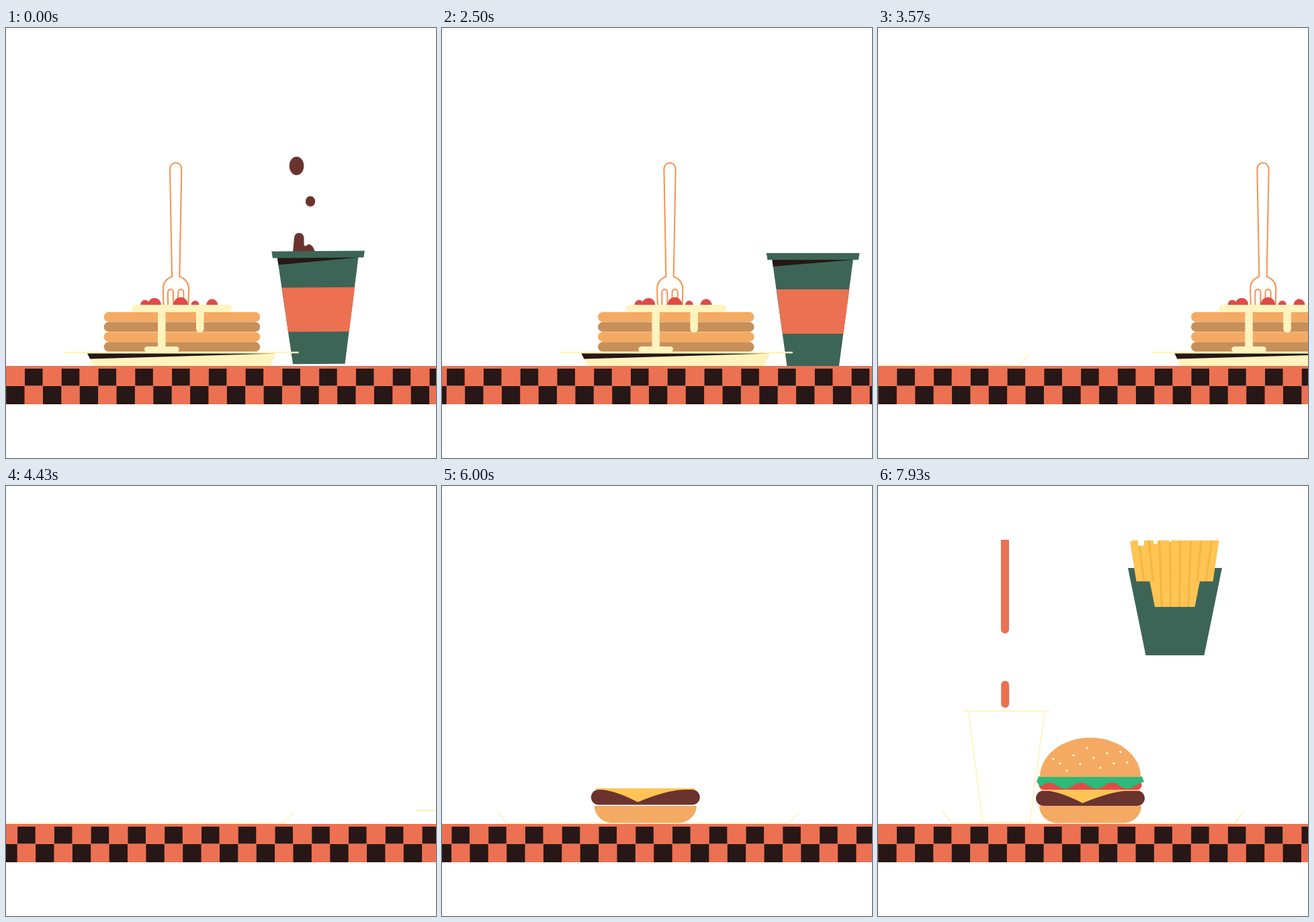
These frames come from a looping animation (640x640 px, 8000 ms). An HTML page with a canvas:

```html
<!DOCTYPE html>
<html lang="en">
<head>
<meta charset="utf-8">
<title>Diner counter</title>
<style>
  html, body { margin: 0; width: 100%; height: 100%; overflow: hidden; background: #fff; }
  canvas { display: block; width: 100vw; height: 100vh; }
</style>
</head>
<body>
<canvas id="stage" width="640" height="640"></canvas>
<script>
const ctx = document.getElementById('stage').getContext('2d');
const LOOP = 8000;
const CREAM = '#fff3be', DARK = '#271716', CORAL = '#eb7152', GREEN = '#3c6558',
      BUN = '#f4aa62', TOAST = '#c88f58', BROWN = '#6b332e', RED = '#e04b48',
      CHEESE = '#ffc453', LEAF = '#2db978', FORK = '#f6924f', FRY_SHADE = '#f2b643';

const clamp = v => Math.max(0, Math.min(1, v));
const mix = (a, b, k) => a + (b - a) * k;

// ---------- drawing helpers ----------
function fill(color, d) {
  ctx.fillStyle = color;
  ctx.fill(new Path2D(d));
}
function line(color, width, d, cap = 'butt') {
  ctx.strokeStyle = color;
  ctx.lineWidth = width;
  ctx.lineCap = cap;
  ctx.stroke(new Path2D(d));
}
function bar(color, x, y, w, h, r = 0) {
  ctx.fillStyle = color;
  ctx.beginPath();
  ctx.roundRect(x, y, w, h, r);
  ctx.fill();
}
function oval(color, x, y, rx, ry = rx) {
  ctx.fillStyle = color;
  ctx.beginPath();
  ctx.ellipse(x, y, rx, ry, 0, 0, 2 * Math.PI);
  ctx.fill();
}
function dome(color, x, y, rx, ry) {
  fill(color, `M${x - rx} ${y}A${rx} ${ry} 0 0 1 ${x + rx} ${y}Z`);
}
function at(x, y, degrees, draw) {
  ctx.save();
  ctx.translate(x, y);
  ctx.rotate(degrees * Math.PI / 180);
  draw();
  ctx.restore();
}

// ---------- motion ----------
// Strong ease in and out of the sideways move, halfway at 3570 ms.
function slide(t) {
  const x = clamp(0.5 + (t - 3570) / 7200), a = x < 0.5 ? 0.755 : 0.73;
  let lo = 0, hi = 1;
  for (let i = 0; i < 24; i++) {
    const s = (lo + hi) / 2, r = 1 - s;
    if (3 * a * s * r * r + 3 * (1 - a) * s * s * r + s ** 3 < x) lo = s; else hi = s;
  }
  return lo * lo * (3 - 2 * lo);
}
// Height above the resting place for a part that lands at the given time.
const height = (t, land) => 420 * (1 - clamp((t - land + 500) / 500) ** 2);
// 1 in the air, 0 shortly after landing.
const airborne = (t, land) => clamp((land - t + 30) / 80);

function drop(t, land, draw) {
  if (t < land - 500) return;
  at(0, -height(t, land), 0, () => draw(airborne(t, land)));
}

// ---------- table ----------
function table(p) {
  const period = 54.77, shift = (28 + p * 12 * period) % period;
  bar(CORAL, 0, 503, 640, 57);
  for (let x = shift - 2 * period; x < 640; x += period) {
    bar(DARK, x, 507, 26.5, 25.3);
    bar(DARK, x + period / 2 - 0.4, 533, 27.3, 27);
  }
}

// ---------- breakfast ----------
function coffeeCup(t) {
  const fallen = Math.min(170, 150 * (t / 420) ** 2);
  if (t < 450) {
    oval(BROWN, 432.5, 205.3 + fallen, 10.8, 13.7);
    oval(BROWN, 453, 258 + fallen, 7.2, 7.8);
    at(0, fallen * 0.7, 0, () => fill(BROWN,
      'M427 333L429 312Q430 305 436 305Q443 305 443.5 313V322Q445 327 448 323Q455 319 460 333V345H427Z'));
  }
  const hop = 1 - clamp(t / 350);
  at(466, 503 - 3 * hop, -0.4 * hop, () => {
    ctx.translate(-466, -503);
    fill(GREEN, 'M396.5 335H535L533.5 345H525.5L504.5 503H427L405 345H398Z');
    fill(CORAL, 'M411.5 389H520L511 455H420.3Z');
    fill(DARK, 'M405 345H525.5L406.5 355Z');
  });
}

function pancakes() {
  line(FORK, 2, 'M234.5 412L233.8 388Q234 375 247 370L244 209.5A8.6 8.6 0 0 1 261.3 209.5L258.3 370' +
    'Q271.5 375 272 388L271.3 412M241 412V393A4 4 0 0 1 249 393V412M256.2 412V393A4 4 0 0 1 264.3 393V412');
  for (const [x, r] of [[207, 7], [221, 10], [260, 11], [281.5, 6], [306.7, 8.5]])
    dome(RED, x, 412.2, r, r + 0.4);
  for (let i = 0; i < 4; i++)
    bar(i % 2 ? TOAST : BUN, 145.7, 422.7 + i * 14.85, 232.5, 14.6, 7.3);
  bar(CREAM, 187.3, 412, 149.2, 11, 5.5);
  bar(CREAM, 226, 416, 11.5, 62);
  bar(CREAM, 283, 416, 11.5, 37.5, 5.7);
  bar(CREAM, 206, 474, 51.5, 8.5, 4.2);
  fill(CREAM, 'M121 484H402L393.5 503H130.5Z');
  fill(DARK, 'M121 484.3L402 484.5L125 492.5Z');
  line(CREAM, 2.4, 'M88 483H435.5');
}

// ---------- burger meal ----------
function sodaCup(t) {
  const land = 6600;
  if (t < land - 500) return;
  const since = Math.max(0, t - land);
  const tilt = -4.6 * Math.exp(-since / 1000) * Math.cos(2 * Math.PI * since / 484);
  at(191, 501 - height(t, land), tilt, () =>
    line(CREAM, 1.8, 'M-64 -166H64M-56.5 -166L-35 0H35L57 -166'));
}

// Flat top and wavy hem at rest; in the air the leaf hangs with one long tip.
function lettuce(k) {
  const top = v => mix(433, 451 - 22 * Math.abs(v) ** 2.2 + 5 * v ** 3, k);
  const hem = v => {
    const edge = 80 * (1 - Math.abs(v)), d = 80 * v;
    const resting = Math.min(445.3 + 4.5 * Math.cos((d + 38) * 2 * Math.PI / 47), 440 + 1.5 * edge);
    const flying = Math.min(467 + 14 * Math.exp(-(((d - 14) / 9) ** 2)), 430 + 2.2 * edge + 4 * v);
    return mix(resting, flying, k);
  };
  const points = [], steps = 40;
  for (let i = 0; i <= steps; i++) {
    const v = 2 * i / steps - 1, x = 316 + 3 * k;
    points.push([x + 76.5 * v, top(v)]);
    points.unshift([x + 79 * v, hem(v)]);
  }
  fill(LEAF, 'M' + points.join('L') + 'Z');
  line(LEAF, 1.5, 'M' + points.join('L') + 'Z', 'round');
}

function topBun(k) {
  const w = 75 - 2.5 * k;
  at(316 + 2 * k, 433, -5 * k, () => {
    dome(BUN, 0, 0, w, 58.5);
    fill(BUN, `M${-w} -0.5Q0 ${15 * k} ${w} -0.5Z`);
    for (let i = 0; i < 12; i++) {
      const x = -55 + 10 * i, level = 0.18 + 0.65 * ((0.764 + 0.618 * i) % 1);
      oval(CREAM, x, -58.5 * Math.sqrt(1 - (x / 75) ** 2) * level, 1.8, 1.8 + 0.3 * k);
    }
  });
}

function burger(t) {
  drop(t, 5381, k => {
    const s = 16 * k;
    fill(BUN, `M240 476Q316 ${476 + s} 392 476C392 490 380 501 366 501.5` +
      `Q316 ${501.5 + s} 266 501.5C252 501 240 490 240 476Z`);
  });
  at(0, -1.5 * clamp((6800 - t) / 100), 0, () => {
    drop(t, 5557, k => line(BROWN, 22.5, `M246.3 464.8Q316 ${464.8 + 16 * k} 385.7 464.8`, 'round'));
    drop(t, 6000, () => fill(CHEESE,
      'M242 451.5H390V453.5H372Q345 455 304.5 472Q272 455 250 453.5H242Z'));
    drop(t, 6580, () => bar(RED, 239.5, 438, 153, 14, 7));
  });
  drop(t, 6663, lettuce);
  drop(t, 6794, topBun);
}

function straw() {
  bar(CORAL, 183, 60, 12, 395.5, 6);
  bar(CORAL, 183.2, 526, 12, 40, 6);
}

function fries() {
  fill(GREEN, 'M372 371H512L485.5 501H398.5Z');
  fill(CHEESE, 'M375 332L384.5 391H404.5L412 429H471.5L479 391H498.5L507.5 330L380 330Z');
  for (let x = -53; x <= 56; x += 15.5)
    line(FRY_SHADE, 3, `M${441 + x} 331L${441 + x * 0.85} ${Math.abs(x) > 36 ? 391 : 429}`);
  for (let i = 0; i < 3; i++)
    bar('#fff', 387 + 23 * i, 330, 9 - 3 * i, 8 - 3 * i);
}

function mealTray(t) {
  line(CREAM, 1.8, 'M95.5 485L109.5 501.6H531L545 485');
  drop(t, 8100, straw);
  sodaCup(t);
  burger(t);
  drop(t, 8112, fries);
}

function render(t) {
  const p = slide(t);
  ctx.fillStyle = '#fff';
  ctx.fillRect(0, 0, 640, 640);
  ctx.save();
  ctx.beginPath();
  ctx.rect(0, 80, 640, 480);
  ctx.clip();
  table(p);
  if (p < 0.95) at(640 * p, 0, 0, () => { coffeeCup(t); pancakes(); });
  at(640 * (p - 1), 0, 0, () => mealTray(t));
  ctx.restore();
}

const start = performance.now();
function tick() {
  render((performance.now() - start) % LOOP);
  requestAnimationFrame(tick);
}
tick();
</script>
</body>
</html>
```
